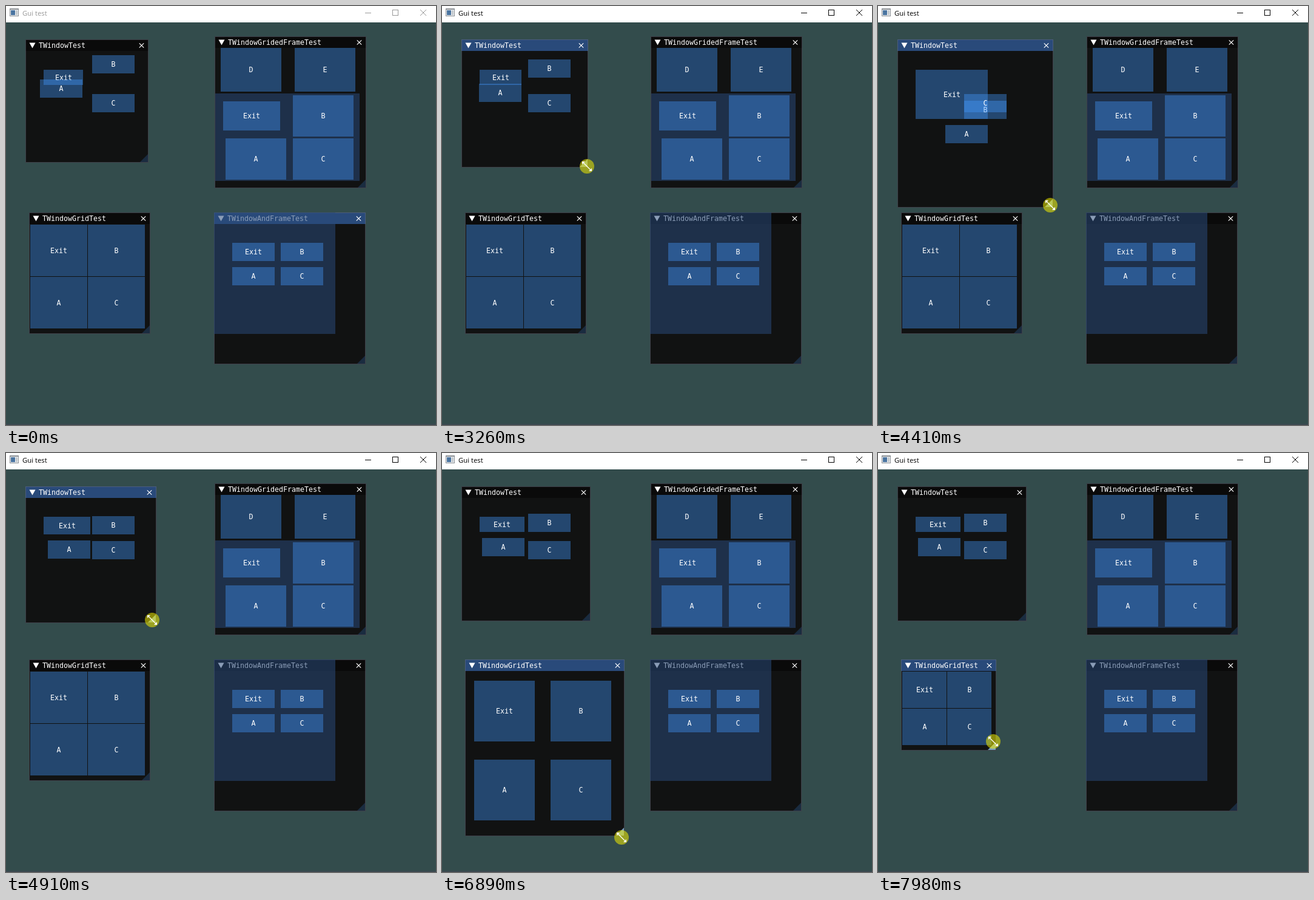
These frames come from a looping animation (709 px wide and 690 px high, 8000 ms). An HTML page with a canvas:

```html
<!DOCTYPE html>
<html lang="en">
<head>
<meta charset="utf-8">
<title>Gui test</title>
<style>
  html, body { margin: 0; width: 100%; height: 100%; overflow: hidden; background: #334c4c; }
  canvas { display: block; }
</style>
</head>
<body>
<canvas id="stage" width="709" height="690"></canvas>
<script>
const ctx = document.getElementById('stage').getContext('2d');
const LOOP = 8000;
const LAYOUT_LAG = 10;
const MONO = '11.63px "DejaVu Sans Mono", monospace';
const SANS = '11.3px "Open Sans", sans-serif';
const BUTTON = 'rgba(66,150,250,0.4)';
const PANEL = 'rgba(41,74,122,0.54)';
const LABELS = ['Exit', 'B', 'A', 'C'];

// Moments at which the user acts.
const ENTER = 340, FOCUS = 1440, GRAB = 2970, DRAG = 3200, DROP = 5310;
const REGRAB = 6010, REDRAG = 6240, END = 7980;

const progress = (t, t0, t1) => Math.min(1, Math.max(0, (t - t0) / (t1 - t0)));
const mix = (a, b, u) => a.map((v, i) => v + (b[i] - v) * u);
const bend = (a, b, c, u) => mix(mix(a, b, u), mix(b, c, u), u);
const shift = ([x, y], dx, dy) => [x + dx, y + dy];

// Lower right corners of the two windows that get resized.
function testCorner(t) {
  const peak = [296, 341];
  if (t < 4200) return mix([234, 257], peak, Math.sin(progress(t, DRAG, 4200) * Math.PI / 2));
  return mix(peak, [244, 276], (1 - Math.cos(progress(t, 4200, 5030) * Math.PI)) / 2);
}

function gridCorner(t) {
  const peak = [321, 660];
  if (t < 7100) return mix([237, 539], peak, progress(t, REDRAG, 7030) ** 1.5);
  return mix(peak, [194, 489], 1 - (1 - progress(t, 7100, END - LAYOUT_LAG)) ** 1.09);
}

// Short pointer moves: start, end, destination.
const HOPS = [
  [1170, 1290, [183, 235]],
  [FOCUS, 2170, [105, 161]],
  [2270, 2560, [242, 257]],
  [2710, GRAB, [233, 256]]
];

function pointerAt(t) {
  if (t < 1140) return bend([490, 690], [220, 500], [189, 240], progress(t, ENTER, 1140));
  if (t < DRAG) {
    return HOPS.reduce((p, [t0, t1, to]) => mix(p, to, progress(t, t0, t1) ** 2.4), [189, 240]);
  }
  if (t < DROP) {
    const u = progress(t, DRAG, 5010);
    return shift(testCorner(t), -1 - 5 * u, -1 - 3 * u);
  }
  if (t < REDRAG) return bend([238, 272], [272, 400], [234, 545], progress(t, DROP, REGRAB));
  return shift(gridCorner(t), -4, 6 - 20 * progress(t, REDRAG, END) ** 2);
}

function rect(x, y, w, h, color) {
  ctx.fillStyle = color;
  ctx.fillRect(x, y, w, h);
}

function poly(points, fill, stroke) {
  ctx.beginPath();
  points.forEach(([x, y]) => ctx.lineTo(x, y));
  ctx.closePath();
  if (stroke) {
    ctx.strokeStyle = stroke;
    ctx.stroke();
  }
  ctx.fillStyle = fill;
  ctx.fill();
}

function lines(color, width, ...segments) {
  ctx.strokeStyle = color;
  ctx.lineWidth = width;
  ctx.beginPath();
  for (const [x0, y0, x1, y1] of segments) {
    ctx.moveTo(x0, y0);
    ctx.lineTo(x1, y1);
  }
  ctx.stroke();
  ctx.lineWidth = 1;
}

function cross(x, y, r, color, width) {
  lines(color, width, [x - r, y - r, x + r, y + r], [x + r, y - r, x - r, y + r]);
}

function text(str, x, y, color = '#fff', font = MONO, align = 'left') {
  ctx.font = font;
  ctx.textAlign = align;
  ctx.fillStyle = color;
  ctx.fillText(str, x, y);
}

function button(label, x, y, w, h) {
  rect(x, y, w, h, BUTTON);
  text(label, Math.round(x + w / 2), Math.round(y + h / 2) + 4, '#fff', MONO, 'center');
}

// Four buttons in two columns.
function buttonGrid(x, y, stepX, stepY, w, h) {
  LABELS.forEach((label, i) => button(label, x + (i % 2) * stepX, y + (i >> 1) * stepY, w, h));
}

function panel(title, x, y, right, bottom, active, gripped) {
  const w = right - x, h = bottom - y;
  rect(x - 1, y - 1, w + 2, h + 2, 'rgba(15,15,15,0.94)');
  rect(x - 1, y - 1, w + 2, 19, active ? '#294a7a' : '#0a0a0a');
  poly([[right, bottom - 13], [right, bottom], [right - 13, bottom]],
    gripped ? '#78a0be' : 'rgba(66,150,250,0.2)');
  ctx.strokeStyle = 'rgba(110,110,128,0.5)';
  ctx.strokeRect(x - 0.5, y - 0.5, w + 1, h + 1);
  poly([[x + 5.5, y + 4.5], [x + 15.5, y + 4.5], [x + 10.5, y + 13.5]], '#fff');
  text(title, x + 21, y + 13);
  cross(right - 10.5, y + 9, 3.7, '#fff', 1.2);
}

function caption(focused) {
  const ink = focused ? '#000' : '#999';
  rect(0, 0, 709, 27, '#fff');
  rect(6, 4, 15, 13, '#8a8f94');
  rect(7, 6, 13, 10, '#eef0f2');
  rect(8, 7, 7, 8, '#4a74a0');
  rect(16, 7, 3, 8, '#c3c9ce');
  text('Gui test', 27, 16, ink, SANS);
  lines(ink, 1, [592, 11.5, 602, 11.5]);
  ctx.strokeRect(637.5, 6.5, 9, 9);
  cross(688, 11, 5, ink, 1);
}

function testWindow(t) {
  const [right, bottom] = testCorner(t).map(Math.round);
  panel('TWindowTest', 33, 56, right, bottom, t >= FOCUS && t < REDRAG, t >= GRAB && t < DROP);
  const [innerX, innerY] = testCorner(t - LAYOUT_LAG).map(Math.round);
  const edge = innerX - 108, top = innerY - 136;
  button('Exit', 62, 105, Math.max(65, edge - 62), Math.max(25, top - 115));
  button('A', edge - 70, top, 70, 30);
  button('B', 142, top - 40, 70, 30);
  button('C', 142, 145, 70, 30);
}

function gridWindow(t) {
  const [right, bottom] = gridCorner(t).map(Math.round);
  const active = t >= REDRAG;
  panel('TWindowGridTest', 39, 341, right, bottom, active, active);
  const [innerX, innerY] = gridCorner(t - LAYOUT_LAG).map(Math.round);
  const stepX = Math.round((innerX - 47) / 2), stepY = Math.round((innerY - 367) / 2);
  const w = Math.min(100, stepX - 1), h = Math.min(100, stepY - 1);
  const x = 40 + Math.round((stepX - 1 - w) / 2), y = 360 + Math.round((stepY - 1 - h) / 2);
  buttonGrid(x, y, stepX, stepY, w, h);
}

function gridedFrameWindow() {
  panel('TWindowGridedFrameTest', 345, 51, 593, 299);
  button('D', 354, 69, 100, 72);
  button('E', 476, 69, 100, 72);
  rect(345, 144, 238, 144, PANEL);
  button('Exit', 358, 157, 94, 48);
  button('B', 473, 147, 100, 68);
  button('A', 362, 218, 100, 68);
  button('C', 473, 218, 100, 68);
}

function frameWindow(t) {
  panel('TWindowAndFrameTest', 344, 341, 592, 589, t < FOCUS);
  rect(343, 340, 200, 200, PANEL);
  buttonGrid(373, 390, 80, 40, 70, 30);
}

function pointer(t) {
  if (t < ENTER) return;
  const [x, y] = pointerAt(t).map(Math.round);
  const pressed = (t >= GRAB && t < DROP) || t >= REGRAB;
  const resizing = (t >= 2710 && t < DROP) || t >= REGRAB;
  if (pressed) {
    ctx.beginPath();
    ctx.arc(x, y, 12, 0, Math.PI * 2);
    ctx.fillStyle = 'rgba(240,235,0,0.55)';
    ctx.fill();
  }
  ctx.save();
  ctx.translate(x, y);
  if (resizing) {
    lines('#fff', 1.2, [-7, -7, 7, 7]);
    poly([[-8, -8], [-3, -8], [-8, -3]], '#fff');
    poly([[8, 8], [3, 8], [8, 3]], '#fff');
  } else {
    poly([[0.5, 0.5], [0.5, 16], [4, 12.7], [6.4, 18.2], [8.7, 17.2], [6.4, 11.8], [11.3, 11.8]],
      '#fff', 'rgba(0,0,0,0.8)');
  }
  ctx.restore();
}

function draw(t) {
  rect(0, 0, 709, 690, '#334c4c');
  rect(0, 688, 709, 2, '#3b4850');
  caption(t >= FOCUS);
  gridedFrameWindow();
  frameWindow(t);
  gridWindow(t);
  testWindow(t);
  pointer(t);
}

const start = performance.now();
function tick() {
  draw((performance.now() - start) % LOOP);
  requestAnimationFrame(tick);
}
tick();
</script>
</body>
</html>
```
